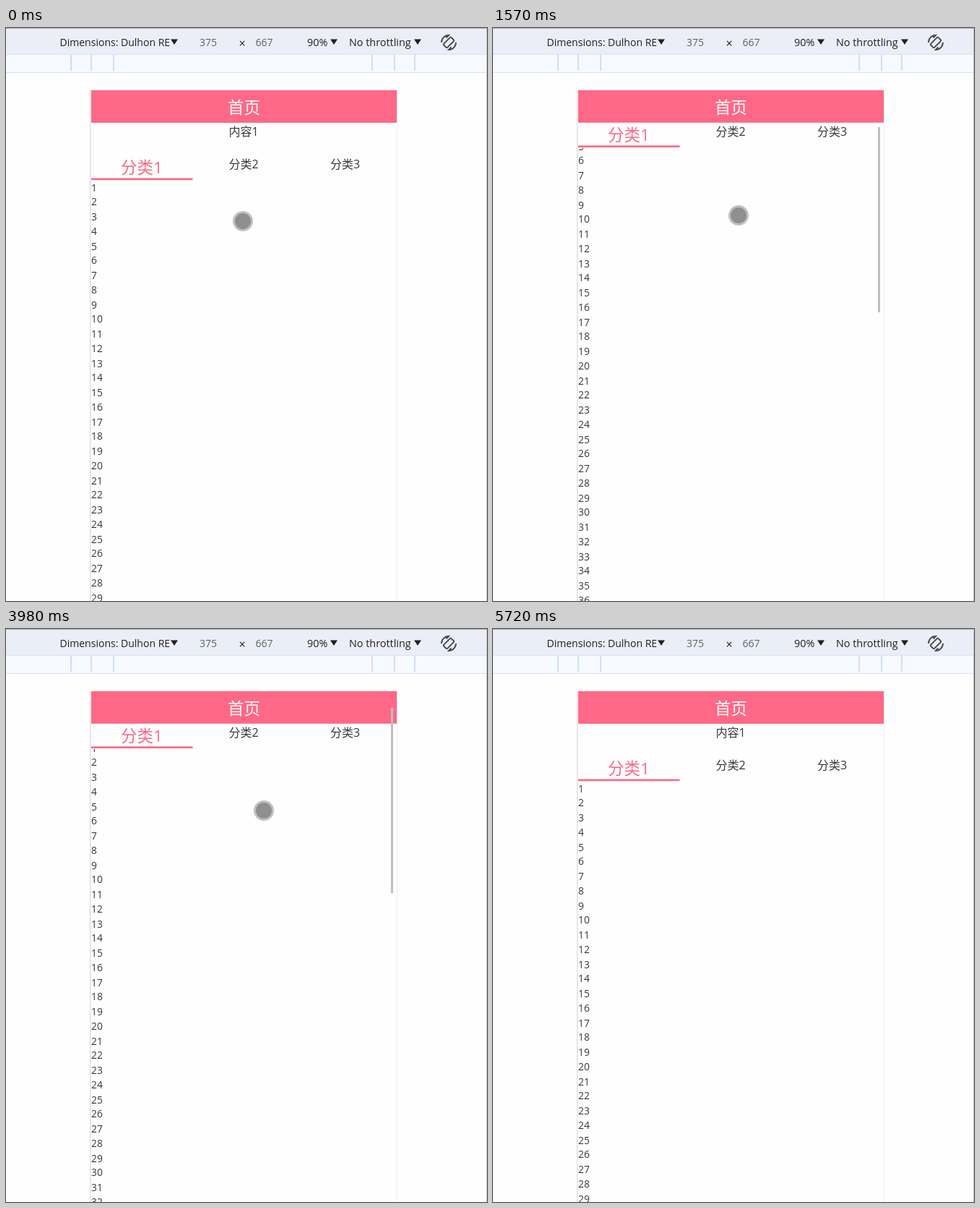
An HTML page for the animation above (5.82 s loop, 666 by 792 pixels).

```html
<!DOCTYPE html>
<html lang="zh">
<head>
<meta charset="utf-8">
<title>Sticky tabs</title>
<style>
  html, body { margin: 0; width: 100%; height: 100%; overflow: hidden; background: #fefefe; }
  svg { display: block; width: 666px; height: 792px; }
  text { font-family: "Open Sans", "Noto Sans CJK SC", "Noto Sans CJK", sans-serif; fill: #36383c; }
  .bar text { font-size: 14px; fill: #202124; }
  .bar .dim { fill: #5f6368; }
  .bar .wide { font-size: 14.4px; }
  .mid { text-anchor: middle; font-size: 16px; }
  .big { text-anchor: middle; font-size: 22.5px; }
  .big.pink { fill: #fd6a87; }
  .big.white { fill: #fff; }
  #list { font-size: 13.8px; }
</style>
</head>
<body>
<svg viewBox="0 0 666 792">
  <clipPath id="screen"><rect x="118" y="86" width="423" height="706"/></clipPath>
  <rect width="666" height="792" fill="#fefefe"/>
  <rect x="116" y="86" width="1" height="706" fill="#dedede"/>
  <rect x="117" y="86" width="1" height="706" fill="#f0f0f0"/>
  <rect x="541" y="86" width="1" height="706" fill="#ececec"/>

  <g clip-path="url(#screen)">
    <g id="list"></g>
    <text id="content" class="mid" x="329" y="149">内容1</text>
    <g id="tabs">
      <rect x="118" y="176" width="423" height="35" fill="#fefefe"/>
      <text class="big pink" x="188" y="201">分类1</text>
      <text class="mid" x="329" y="194">分类2</text>
      <text class="mid" x="469.5" y="194">分类3</text>
      <rect x="118" y="207.5" width="140.5" height="2.7" fill="#fd6a87"/>
    </g>
    <g id="head">
      <rect x="118" y="86" width="423" height="45" fill="#ff6886"/>
      <text class="big white" x="329.5" y="118">首页</text>
    </g>
    <rect id="thumb" x="533" width="3" height="256" fill="#bfbfbf"/>
  </g>

  <g class="bar">
    <rect width="666" height="36" fill="#ebeef6"/>
    <rect width="666" height="1" fill="#a5a7ab"/>
    <rect y="37" width="666" height="24" fill="#f7faff"/>
    <rect y="36" width="666" height="1" fill="#d3e3fd"/>
    <rect y="61" width="666" height="1" fill="#d3e0f5"/>
    <path d="M90 37v22m28-22v22m31-22v22m358-22v22m31-22v22m28-22v22" stroke="#cddffb" stroke-width="2"/>
    <text x="74.5" y="25">Dimensions: Dulhon RE</text>
    <text class="dim" x="268" y="25">375</text>
    <text x="322.5" y="27" style="font-size:16px">×</text>
    <text class="dim" x="345.5" y="25">667</text>
    <text class="wide" x="417" y="25">90%</text>
    <text class="wide" x="475" y="25">No throttling</text>
    <path d="M228 15.5h10l-5 7.5zM449 15.5h10l-5 7.5zM565 15.5h10l-5 7.5z" fill="#202124"/>
    <g transform="translate(613 20) scale(-1 1)" fill="none" stroke="#46494d" stroke-width="1.9">
      <rect x="-3.6" y="-7.4" width="7.2" height="14.8" rx="1.2" transform="rotate(-45)"/>
      <path d="M-10 0A10 10 0 0 0 0 10L-3.5 6.5M10 0A10 10 0 0 0 0-10L3.5-6.5"/>
    </g>
  </g>
  <rect x="665" width="1" height="792" fill="#c4c6ca"/>

  <circle id="touch" r="12.5" fill="#8f8f8f" stroke="#c0c0c0" stroke-width="3"/>
  <path id="arrow" d="M.5.5V16.5L4.3 12.9 6.8 18.6 9.3 17.5 6.8 12H11.8Z" fill="#fff" stroke="#222"/>
</svg>
<script>
const LOOP = 5820, STEP = 130;       // ms; the picture refreshes once per step
const ROWS = 100, PITCH = 20.25;
const NOTCH = 112.5, STUCK = 45;     // px per wheel notch, px until the tabs stick
const SHOW = 780, LEAVE = 5400, FADE = 5570, GONE = 5720;

// Wheel glides: start, end, notches reached
const glides = [[780, 1170, 1], [1487, 2340, 12], [2600, 3250, 1],
  [3400, 3560, 0], [3830, 4290, 8], [4490, 5150, 0]];

// Pointer path: time, x, y
const path = [[0, 328, 267], [390, 326, 260], [1170, 328, 256], [1560, 340, 259],
  [2340, 349, 260], [3250, 355, 255], [4290, 358, 249], [5150, 363, 247], [5590, 624, 741]];

const $ = id => document.getElementById(id);
const move = (id, x, y) => $(id).setAttribute("transform", `translate(${x} ${y})`);
const fade = (id, o) => $(id).setAttribute("opacity", o);
const progress = (t, a, b) => Math.min(1, Math.max(0, (t - a) / (b - a)));
const smooth = p => p * p * (3 - 2 * p);
const mix = (a, b, p) => a + (b - a) * p;

for (let i = 0; i < ROWS; i++) {
  const row = document.createElementNS("http://www.w3.org/2000/svg", "text");
  row.setAttribute("x", 118);
  row.setAttribute("y", 226 + Math.floor(i * PITCH) - (i % 4 === 1));
  row.textContent = i + 1;
  $("list").appendChild(row);
}

const scrollAt = t => NOTCH * glides.reduce(
  (pos, [a, b, to]) => mix(pos, to, smooth(progress(t, a, b))), 0);

function pointerAt(t) {
  let [, x, y] = path[0];
  for (let i = 1; i < path.length; i++) {
    const p = progress(t, path[i - 1][0], path[i][0]);
    x = mix(x, path[i][1], p);
    y = mix(y, path[i][2], p);
  }
  return [Math.round(x), Math.round(y)];
}

function draw(now) {
  const t = Math.floor(now / STEP) * STEP;
  const scroll = scrollAt(t), top = Math.round(scroll);
  const jitter = top - scroll;       // fixed parts wobble by the rounding error
  const [x, y] = pointerAt(t);

  move("list", 0, -top);
  move("content", 0, -top);
  move("tabs", 0, scroll < STUCK ? -top : jitter - STUCK);
  move("head", 0, jitter);
  $("thumb").setAttribute("y", Math.round(89.7 + 0.3427 * scroll));
  fade("thumb", t <= SHOW ? 0 : 1 - progress(t, FADE - 20, FADE + 60));
  if (t >= GONE) fade("thumb", 0);

  move("touch", x, y);
  move("arrow", x, y);
  fade("touch", t < LEAVE ? 1 : 0);
  fade("arrow", t >= LEAVE && t < GONE ? 1 : 0);
}

const start = performance.now();
function tick() {
  draw((performance.now() - start) % LOOP);
  requestAnimationFrame(tick);
}
tick();
</script>
</body>
</html>
```
